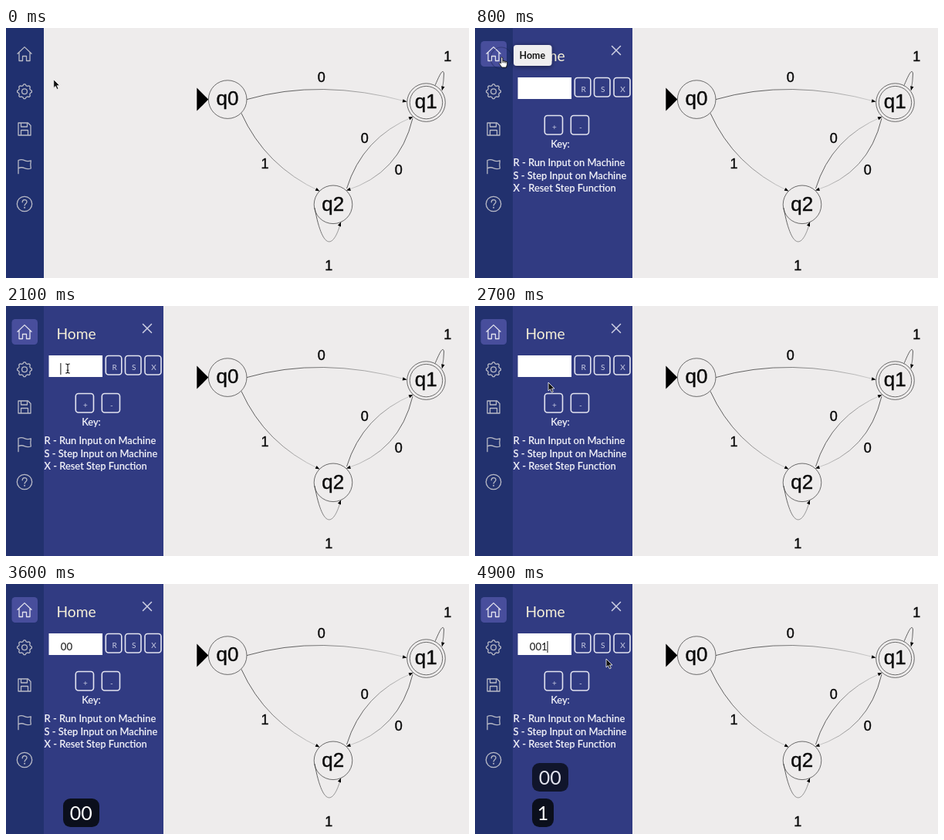
Write an HTML page that moves like this. It is 600 px wide and 324 px high and loops after 5000 ms.

```html
<!DOCTYPE html>
<html lang="en">
<head>
<meta charset="utf-8">
<title>State machine editor</title>
<style>
html, body { margin: 0; width: 100%; height: 100%; overflow: hidden; background: #eeecec; }
svg { display: block; width: 600px; height: 324px; }
text { font-family: Lato, "Open Sans", sans-serif; }
.graph text { font-family: "Liberation Sans", Arial, sans-serif; text-anchor: middle; fill: #0a0a0a; stroke: #0a0a0a; stroke-width: .4; }
.graph circle { fill: none; stroke: #333; stroke-width: .7; }
.icons { fill: none; stroke: #b9bac6; stroke-width: 1.3; stroke-linejoin: round; stroke-linecap: round; }
.body { font-size: 12.9px; font-weight: 500; fill: #f5f5fa; stroke: #f5f5fa; stroke-width: .15; }
.btn rect { fill: none; stroke: #e3e4f0; stroke-width: 1.6; }
.btn text { font-size: 10px; fill: #c9cce2; text-anchor: middle; }
.keycap text { font-size: 25px; fill: #fff; text-anchor: middle; }
</style>
</head>
<body>
<svg viewBox="0 0 600 324">
  <defs>
    <filter id="soft" x="-30%" y="-50%" width="160%" height="200%">
      <feDropShadow dx="0" dy="1" stdDeviation="3.2" flood-color="#000" flood-opacity=".5"/>
    </filter>
  </defs>
  <rect width="600" height="324" fill="#eeecec"/>
  <g class="graph" id="graph">
    <path d="M247.3 77.6L262.3 92.6L247.3 107.6Z" fill="#000"/>
  </g>

  <g id="panel">
    <rect x="49" width="155" height="324" fill="#313b82"/>
    <text x="65.5" y="43" font-size="19.2" fill="#f6f0d8">Home</text>
    <path d="M177.5 23.5L188.5 34.5M188.5 23.5L177.5 34.5" stroke="#cfd1e4" stroke-width="1.5" stroke-linecap="round"/>
    <rect x="55.5" y="64" width="69.5" height="28" fill="#fff"/>
    <text id="entry" x="70.8" y="86" font-size="13.2" font-weight="500" fill="#222"></text>
    <rect id="caret" x="93.4" y="74" width="1" height="15" fill="#111"/>
    <g class="btn" id="buttons"></g>
    <text class="body" x="110.5" y="154.5" text-anchor="middle">Key:</text>
    <text class="body" x="49.5" y="179">R - Run Input on Machine</text>
    <text class="body" x="49.5" y="195.5">S - Step Input on Machine</text>
    <text class="body" x="49.5" y="212">X - Reset Step Function</text>
  </g>

  <rect id="side" width="49" height="324" fill="#20306f"/>
  <rect id="active" x="7.5" y="17" width="33.5" height="33" rx="4.5" fill="#484e9c"/>
  <g class="icons">
    <path id="house" d="M15 33.2L24 24.6L33 33.2M17 31.5V42.5H21.5V36.5H26.5V42.5H31V31.5"/>
    <path id="gear"/>
    <circle cx="24" cy="82.2" r="3.4"/>
    <path d="M16 123H28.5L32 126.5V139H16ZM19.5 123V128H27.5V123M19.5 139V132.5H28.5V139"/>
    <path d="M16 188.7V171.5Q20 169.8 24 171.6T32.3 171.8Q31.3 177 32.3 182Q28 183.4 24 181.6T16 181.8"/>
    <circle cx="24" cy="228" r="9.7"/>
    <path d="M21.2 225.8C21.2 221.7 27 221.8 27 225.3C27 227.7 24.1 227.6 24.1 230"/>
    <circle cx="24.1" cy="232.8" r=".4"/>
  </g>

  <g id="tip">
    <rect x="50" y="22" width="49.5" height="27" rx="4" fill="#efeeef" filter="url(#soft)"/>
    <text x="57.6" y="39.6" font-size="12.4" font-weight="700" fill="#151515">Home</text>
  </g>

  <g class="keycap" id="first">
    <rect x="74" y="278" width="47" height="37" rx="9.5" fill="#0b0f1c"/>
    <text id="firstText" x="97.3" y="305.5">00</text>
  </g>
  <g class="keycap" id="second">
    <rect x="74" y="278" width="28" height="37" rx="9.5" fill="#0b0f1c"/>
    <text x="88" y="305.5">1</text>
  </g>

  <circle id="ring" cx="34" cy="39" fill="none" stroke="#1b2350" stroke-width="1.2"/>
  <g id="pointer">
    <path id="arrow" d="M0 0V11L2.5 8.7L4.3 12.8L6.3 12L4.5 8H8Z" fill="#111" stroke="#fff" stroke-width=".8"/>
    <path id="hand" d="M-2.5 -5.5C-2.5 -7.3 -.5 -7.3 -.3 -5.5V-2.2L2.8 -1.6L5.5 -.6V2.6L4.2 6.5H-1.4L-4.8 1.6C-5.2 .4 -3.6 0 -2.5 1.3ZM-.3 -2.2V.6M1.7 -1.8V.8M3.6 -1.3V1" fill="#fff" stroke="#111" stroke-width=".9" stroke-linejoin="round"/>
    <path id="beam" d="M-2.8 -6Q0 -6 0 -4.2Q0 -6 2.8 -6M0 -4.2V4.2M-2.8 6Q0 6 0 4.2Q0 6 2.8 6M-1.4 2.2H1.4" fill="none" stroke="#111" stroke-width="1.1"/>
  </g>
</svg>
<script>
const LOOP = 5000, STEP = 100;
const $ = id => document.getElementById(id);

function add(parent, tag, attrs, label) {
  const el = document.createElementNS("http://www.w3.org/2000/svg", tag);
  for (const key in attrs) el.setAttribute(key, attrs[key]);
  if (label) el.textContent = label;
  return parent.appendChild(el);
}

const graph = $("graph");

// Edges fade toward their arrowheads.
function edge(x1, y1, curve, x2, y2, angle, label, lx, ly, tail = "#c4c4c4") {
  const id = "fade" + graph.childElementCount;
  const fade = add(graph, "linearGradient", { id, gradientUnits: "userSpaceOnUse", x1, y1, x2, y2 });
  add(fade, "stop", { offset: .3, "stop-color": "#333" });
  add(fade, "stop", { offset: 1, "stop-color": tail });
  add(graph, "path", { d: `M${x1} ${y1}${curve} ${x2} ${y2}`, fill: "none", stroke: `url(#${id})`, "stroke-width": .75 });
  add(graph, "path", { d: "M0 0L-5.5 -2.2V2.2Z", fill: "#000", transform: `translate(${x2} ${y2}) rotate(${angle})` });
  add(graph, "text", { x: lx, y: ly, "font-size": 18 }, label);
}
edge(312, 92.6, "Q408 65", 519.5, 95.5, 12, "0", 408.8, 69.5);
edge(305, 110.5, "Q336 179", 406.5, 211.5, 28, "1", 335.5, 181.6);
edge(441.5, 208, "Q462 142", 527.5, 115, -24, "0", 464.7, 148.6);
edge(527, 117, "Q510 189", 441, 210.5, 162, "0", 508.8, 189.6);
edge(556, 74.5, "C561 63 566 51 567.5 59Q567.5 68", 565, 81, 104, "1", 572.3, 42.6, "#777");
edge(400, 233, "C410 288 424 288", 434, 251.5, -68, "1", 418.3, 313.6, "#777");

for (const [x, y, name] of [[287.2, 92.6, "q0"], [544.5, 96.6, "q1"], [424, 228.8, "q2"]]) {
  add(graph, "circle", { cx: x, cy: y, r: 24.8 });
  add(graph, "text", { x: x - .3, y: y + 7.8, "font-size": 26 }, name);
}
add(graph, "circle", { cx: 544.5, cy: 96.6, r: 21.2 });

for (const [x, y, w, name] of [[129.3, 64.5, 20.5, "R"], [154.5, 64.5, 20.5, "S"], [180, 64.5, 21, "X"],
                               [90.3, 113.5, 23.2, "+"], [124.3, 113.5, 23.2, "-"]]) {
  add($("buttons"), "rect", { x, y, width: w, height: 24.5, rx: 3.5 });
  add($("buttons"), "text", { x: x + w / 2 + 1, y: y + 18.3 }, name);
}

const teeth = [];
for (let i = 0; i < 32; i++) {
  const a = (i - .5) * Math.PI / 16, r = i % 4 < 2 ? 9.4 : 7.7;
  teeth.push((24 + r * Math.sin(a)).toFixed(2) + " " + (82.2 - r * Math.cos(a)).toFixed(2));
}
$("gear").setAttribute("d", "M" + teeth.join("L") + "Z");

// time, x, y
const path = [
  [0, 61.7, 66.7], [100, 61.7, 66.7], [500, 36.2, 44.6], [1200, 36.2, 44.6], [1500, 80, 81],
  [2100, 80, 81], [2500, 95, 99], [4300, 95, 99], [4800, 170, 97], [5000, 170, 97]
];
const ease = u => u * u * (3 - 2 * u);
const ramp = (t, a, b) => ease(Math.min(1, Math.max(0, (t - a) / (b - a))));

function place(t) {
  let i = 1;
  while (i < path.length - 1 && t >= path[i][0]) i++;
  const [a, x, y] = path[i - 1], [b, X, Y] = path[i], u = ramp(t, a, b);
  return [x + (X - x) * u, y + (Y - y) * u];
}

const show = (id, on) => $(id).style.opacity = +on;

function draw(t) {
  const [x, y] = place(t);
  const open = t >= 800;
  const hover = t >= 400 && t < 1300;
  const inField = open && x > 56 && x < 125 && y > 64 && y < 92;
  const typing = t >= 3000 && t < 4300;
  const kind = hover ? "hand" : inField ? "beam" : "arrow";
  for (const name of ["arrow", "hand", "beam"]) show(name, name === kind);
  show("pointer", !typing);
  $("pointer").setAttribute("transform", `translate(${x} ${y})`);

  show("panel", open);
  $("side").setAttribute("fill", open ? "#22316e" : "#20306f");
  $("house").setAttribute("stroke", t >= 400 ? "#e2e2ee" : "#b9bac6");
  show("active", t >= 400);
  show("tip", ramp(t, 400, 600) * (1 - ramp(t, 1200, 1400)));
  show("ring", t >= 800 && t < 1100 ? .45 * (1 - (t - 800) / 300) : 0);
  $("ring").setAttribute("r", 14 + Math.max(0, t - 800) / 60);

  const typed = t < 3000 ? "" : t < 3200 ? "0" : t < 4000 ? "00" : "001";
  $("entry").textContent = typed;
  const blink = t >= 4000 || (t >= 1900 && t < 2500) || (t >= 3000 && t < 3500);
  show("caret", blink);
  $("caret").setAttribute("x", 70.4 + typed.length * 7.7);

  const lift = ramp(t, 3900, 4200);
  show("first", t >= 3000 ? 1 - .15 * lift : 0);
  $("first").setAttribute("transform", `translate(0 ${-46 * lift})`);
  const single = typed === "0";
  $("firstText").textContent = single ? "0" : "00";
  $("firstText").setAttribute("x", single ? 90 : 97.3);
  $("first").firstElementChild.setAttribute("width", single ? 32 : 47);
  show("second", t >= 4000 ? lift : 0);
}

const start = performance.now();
function tick() {
  const t = (performance.now() - start) % LOOP;
  draw(Math.floor(t / STEP) * STEP);
  requestAnimationFrame(tick);
}
draw(0);
requestAnimationFrame(tick);
</script>
</body>
</html>
```
